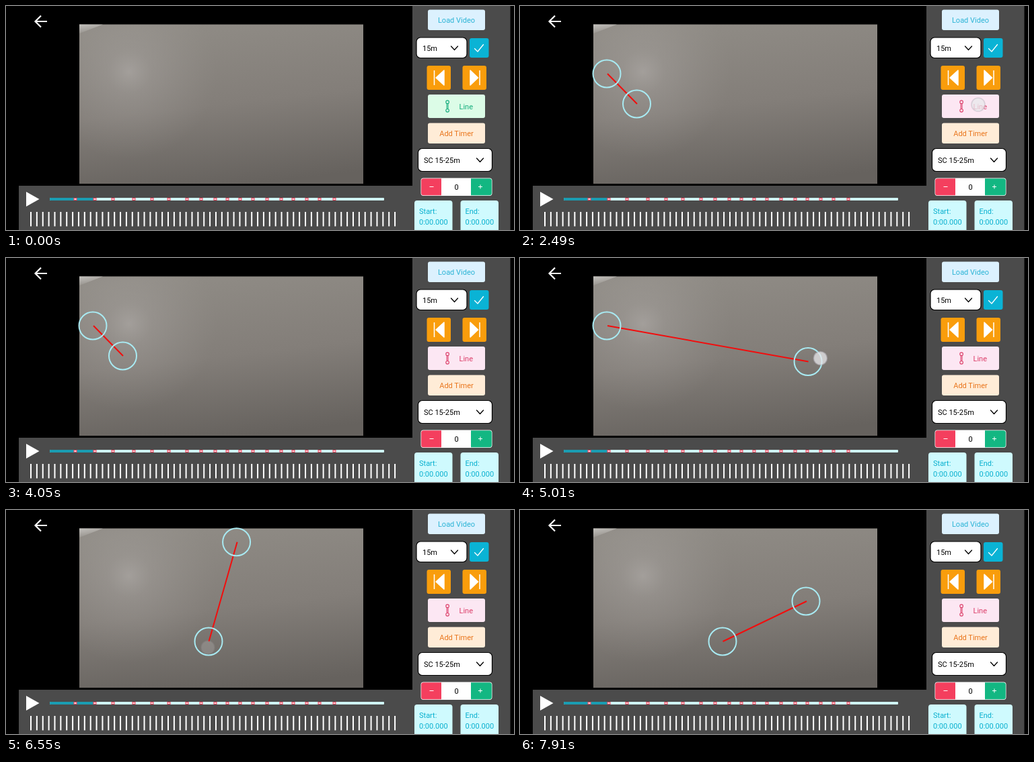
Write an HTML page that moves like this. It is 755 px wide and 334 px high and loops after 7990 ms.

```html
<!DOCTYPE html>
<html lang="en">
<head>
<meta charset="utf-8">
<title>Line tool</title>
<style>
  html, body { margin: 0; width: 100%; height: 100%; overflow: hidden; background: #000; }
  svg { display: block; width: 755px; height: 334px; }
  text { font: 11px Roboto, sans-serif; }
  .mid { text-anchor: middle; }
  .stroke { fill: none; stroke-width: 1.3; stroke-linecap: round; stroke-linejoin: round; }
  .box { fill: #fff; stroke: #000; stroke-width: 1.2; }
  .time { fill: #08b0cf; }
  .skip { fill: #fff; stroke: #fff; stroke-width: 1.5; stroke-linejoin: round; }
</style>
</head>
<body>
<svg viewBox="0 0 755 334">
  <defs>
    <linearGradient id="wall" x1=".4" y1="0" x2=".6" y2="1">
      <stop offset="0" stop-color="#8f8b85"/>
      <stop offset=".5" stop-color="#837e79"/>
      <stop offset="1" stop-color="#66625e"/>
    </linearGradient>
    <radialGradient id="glow" gradientUnits="userSpaceOnUse" cx="183" cy="98" r="130">
      <stop offset="0" stop-color="#b4b0ad" stop-opacity=".6"/>
      <stop offset=".25" stop-color="#aca8a5" stop-opacity=".35"/>
      <stop offset="1" stop-color="#a09c98" stop-opacity="0"/>
    </radialGradient>
    <linearGradient id="corner" x1="0" y1="0" x2=".45" y2="1">
      <stop offset="0" stop-color="#c4c2be"/>
      <stop offset="1" stop-color="#c4c2be" stop-opacity="0"/>
    </linearGradient>
  </defs>

  <path d="M52 14.5L43.5 23L52 31.5M43.5 23H61" fill="none" stroke="#fff" stroke-width="2.2"/>
  <rect x="109" y="27.5" width="422" height="237.5" fill="url(#wall)"/>
  <rect x="109" y="27.5" width="422" height="237.5" fill="url(#glow)"/>
  <path d="M109 27.5H144L109 41Z" fill="url(#corner)"/>

  <path d="M604 0H749.5V334H19V268H604Z" fill="#4b4b4b"/>
  <path d="M30 277L49.5 288L30 299Z" fill="#fff"/>
  <rect x="65" y="286" width="497" height="4" rx="1" fill="#cff5f5"/>
  <rect x="65" y="286" width="67" height="4" rx="1" fill="#1a9db2"/>
  <g id="marks"></g>
  <path id="ticks" stroke="#fff" stroke-width="2"/>

  <rect x="627" y="5.5" width="85" height="30.5" rx="3" fill="#dcf1fe"/>
  <text class="mid" x="669.5" y="25" fill="#2bb4d6">Load Video</text>

  <rect class="box" x="610" y="47" width="75" height="30.5" rx="6"/>
  <text x="619" y="67">15m</text>
  <path class="stroke" stroke="#000" d="M661.5 60L666.5 65.5L671.5 60"/>
  <rect x="689" y="48" width="28.5" height="29" rx="3" fill="#0ab3d5"/>
  <path class="stroke" stroke="#fff" d="M696.5 63.5L701 68L709.5 57.5"/>

  <rect x="625.5" y="89" width="35.5" height="36" rx="3" fill="#f99d0c"/>
  <rect x="678.5" y="89" width="35.5" height="36" rx="3" fill="#f99d0c"/>
  <path class="skip" d="M636.5 96V118M639 107L651 96V118Z"/>
  <path class="skip" d="M704 96V118M701.5 107L690 96V118Z"/>

  <rect id="lineButton" x="627" y="132" width="85" height="35" rx="3"/>
  <g id="lineLabel">
    <path class="stroke" style="stroke-width:1.1" stroke="currentColor"
      d="M655.2 145.2V153.8M657 145.2V153.8M653.8 143.2a2.3 2.3 0 1 0 4.6 0a2.3 2.3 0 1 0 -4.6 0M653.8 155.8a2.3 2.3 0 1 0 4.6 0a2.3 2.3 0 1 0 -4.6 0"/>
    <text x="673.5" y="154" fill="currentColor">Line</text>
  </g>

  <rect x="627" y="174.5" width="85" height="30.5" rx="3" fill="#ffecd7"/>
  <text class="mid" x="669.5" y="194" fill="#e9761d">Add Timer</text>

  <rect class="box" x="612.5" y="212.5" width="110" height="34" rx="6"/>
  <text x="621" y="234">SC 15-25m</text>
  <path class="stroke" stroke="#000" d="M699.5 227L704.5 232.5L709.5 227"/>

  <rect x="616.5" y="256.5" width="106" height="26.5" rx="4" fill="#fff"/>
  <path d="M647 257.2V282.3H620.5Q617.2 282.3 617.2 279V260.5Q617.2 257.2 620.5 257.2Z" fill="#f43f5e"/>
  <path d="M691 257.2V282.3H718.5Q721.8 282.3 721.8 279V260.5Q721.8 257.2 718.5 257.2Z" fill="#13b782"/>
  <path d="M629.5 269.5H635.5M702 269.5H708M705 266.5V272.5" stroke="#fff"/>
  <text class="mid" x="669.5" y="273.5">0</text>

  <rect x="607" y="290" width="56.5" height="50" rx="4" fill="#cffafe"/>
  <rect x="675.5" y="290" width="56.5" height="50" rx="4" fill="#cffafe"/>
  <text class="time" x="614" y="309.5">Start:</text>
  <text class="time" x="614" y="325.5">0:00.000</text>
  <text class="time" x="682.5" y="309.5">End:</text>
  <text class="time" x="682.5" y="325.5">0:00.000</text>

  <g id="ruler">
    <line id="segment" stroke="#f20d0d" stroke-width="2"/>
    <g fill="none" stroke="#a8eaf2" stroke-width="2">
      <circle id="handleA" r="20.5"/>
      <circle id="handleB" r="20.5"/>
    </g>
  </g>
  <circle id="touch" r="10" fill="#e9e9ec" stroke="#b4b0ba" stroke-opacity=".6" stroke-width="1.6"/>
</svg>
<script>
const LOOP = 7990, LEAD = 80, FADE = 200;
const $ = id => document.getElementById(id);
const set = (id, attrs) => {
  for (const name in attrs) $(id).setAttribute(name, attrs[name]);
};

// Handle paths as [time, x, y]
const pathA = [[5370, 129, 101], [5490, 155, 53], [5810, 329, 53], [5890, 342.6, 47.7],
  [7130, 342.6, 47.7], [7650, 425, 136]];
const pathB = [[4290, 173.5, 146], [4650, 296, 156], [5010, 428, 154.5], [5130, 436, 147],
  [5970, 436, 147], [6310, 301, 196]];

const toggles = [1340, 1920, 2490, 2980, 3470];
const drags = [
  { path: pathB, down: 4210, up: 5190, dx: 13, dy: 0 },
  { path: pathA, down: 5290, up: 5890, dx: 2, dy: -1 },
  { path: pathB, down: 5900, up: 6400, dx: -1, dy: 9 },
  { path: pathA, down: 7110, up: 7670, dx: 2, dy: 2 }
];

function along(path, t) {
  const next = path.findIndex(key => key[0] > t);
  if (next === 0) return path[0].slice(1);
  if (next < 0) return path[path.length - 1].slice(1);
  const [t0, x0, y0] = path[next - 1], [t1, x1, y1] = path[next];
  const k = (t - t0) / (t1 - t0);
  return [x0 + (x1 - x0) * k, y0 + (y1 - y0) * k];
}

function touchAt(t) {
  const active = ({ down, up }) => t >= down && t < up + FADE;
  const strength = up => 0.75 * Math.min(1, 1 - (t - up) / FADE);
  const tap = toggles.find(up => active({ down: up - 170, up }));
  if (tap) return [681, 147, strength(tap)];
  const drag = drags.find(active);
  if (!drag) return [0, 0, 0];
  const [x, y] = along(drag.path, t + LEAD);
  return [x + drag.dx, y + drag.dy, strength(drag.up)];
}

function draw(t) {
  const on = toggles.filter(time => t >= time).length % 2 === 1;
  set("lineButton", { fill: on ? "#fce7f3" : "#dcfce7" });
  set("lineLabel", { color: on ? "#dc3f6a" : "#14ad7c" });
  set("ruler", { visibility: on ? "visible" : "hidden" });

  const [ax, ay] = along(pathA, t), [bx, by] = along(pathB, t);
  set("handleA", { cx: ax, cy: ay });
  set("handleB", { cx: bx, cy: by });
  set("segment", { x1: ax + 1, y1: ay, x2: bx + 0.5, y2: by });

  const [cx, cy, opacity] = touchAt(t);
  set("touch", { cx, cy, opacity });
}

const marks = [103, 132, 159, 190, 217, 242, 269, 290, 311, 329, 348, 367, 388, 409, 427, 447, 466, 488];
$("marks").innerHTML = marks.map(x =>
  `<rect x="${x - 2}" y="286.5" width="4" height="3" fill="#f9d3d8" stroke="#ee465f"/>`).join("");
set("ticks", { d: Array.from({ length: 62 }, (_, i) => `M${37 + i * 8.87} 307V328.5`).join("") });

const start = performance.now();
function frame() {
  draw((performance.now() - start) % LOOP);
  requestAnimationFrame(frame);
}
frame();
</script>
</body>
</html>
```
